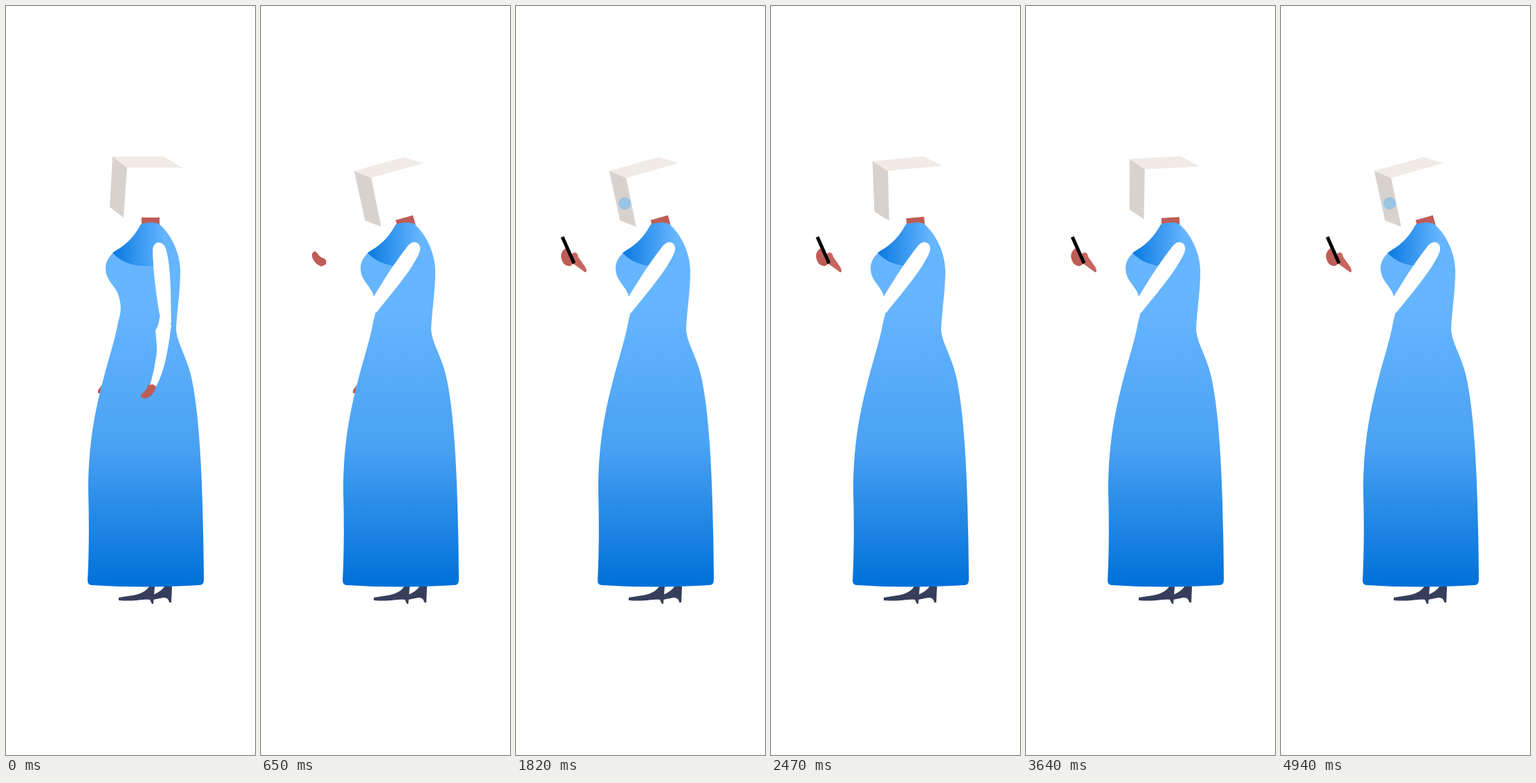
An HTML page for the animation above (5.2 s loop, 360 by 1080 pixels).

```html
<!DOCTYPE html>
<html lang="en">
<head>
<meta charset="utf-8">
<title>Woman in a blue dress</title>
<style>
  html, body { margin: 0; height: 100%; overflow: hidden; background: #fff; }
  svg { display: block; width: 100%; height: 100%; }
</style>
</head>
<body>
<svg viewBox="0 0 360 1080">
  <defs>
    <linearGradient id="cloth" gradientUnits="userSpaceOnUse" x1="0" y1="430" x2="0" y2="835">
      <stop stop-color="#66b5ff"/>
      <stop offset=".5" stop-color="#4aa2f3"/>
      <stop offset="1" stop-color="#0071d9"/>
    </linearGradient>
    <linearGradient id="shade" gradientUnits="userSpaceOnUse" x1="155" y1="0" x2="230" y2="0">
      <stop stop-color="#0a7ae0"/>
      <stop offset="1" stop-color="#66b5ff"/>
    </linearGradient>
  </defs>

  <g fill="#363e5c">
    <path d="M163 853C180 850 199 850 207 837H215L213 862H211L208 856C198 855 187 859 163 857Z"/>
    <path d="M213 849Q226 843 229 837H240L239 860H236Q235 853 228 853L213 856Z"/>
  </g>
  <path id="backHand" fill="#be5c56" d="M139 546L133 554V558L137 559Z"/>
  <path id="neck" fill="#be5c56" d="M196 305H222V320H196Z"/>

  <path fill="url(#cloth)" d="M195 315Q209 310 221 314C237 327 252 355 252 382C252 412 247 440 246 465
    C246 485 262 505 269 540C282 605 285 710 286 827Q286 835 280 835Q200 840 123 835Q118 834 118 828
    Q121 770 119 700C119 640 126 595 139 545C147 512 157 485 163 452C167 440 167 428 161 413
    C155 401 144 394 144 378C144 365 153 357 160 352C176 343 187 330 195 315Z"/>
  <path fill="url(#shade)" d="M195 315Q209 310 221 314L238 338L234 371Q180 384 154 356L160 352C176 343 187 330 195 315Z"/>

  <!-- Limbs are drawn hanging down, with the joint at 0,0 -->
  <g id="forearm">
    <path id="hand" fill="#be5c56" d="M-25 92C-28 104 -36 102 -35 108C-32 113 -23 111 -17 103C-12 96 -13 91 -15 90Q-20 88 -25 92Z"/>
    <path fill="#fff" d="M-8 -7Q-8 2 -14 13C-13 25 -10 42 -14 56Q-16 72 -22 92Q-18 88 -13 94C-2 72 3 52 9 5Z"/>
  </g>
  <path id="upperArm" fill="#fff" d="M-10 3C-10 -12 5 -13 9 0C17 25 16 70 17 105Q15 116 6 114L0 95C-5 65 -9 35 -10 3Z"/>

  <g id="phone">
    <path fill="#be5c56" d="M74 348Q65 352 65 361Q67 375 78 375L84 371Z"/>
    <path fill="#c8655f" d="M81 357Q88 352 90 362L100 376Q104 384 100 384L82 371Z"/>
    <path stroke="#000" stroke-width="5" d="M67 333L84 371"/>
  </g>

  <g id="head">
    <path fill="#d8d2ce" d="M154 217L175 233L170 305L150 290Z"/>
    <path fill="#f0ebe7" d="M154 217L175 233H254L228 217Z"/>
    <circle id="badge" cx="163" cy="268" r="9" fill="#9bc4e2"/>
  </g>
</svg>
<script>
const LOOP = 5200, STEP = 130;
const $ = id => document.getElementById(id);
const move = (id, transform) => $(id).setAttribute('transform', transform);
const show = (id, on) => $(id).style.display = on ? '' : 'none';

function draw(t) {
  const ramp = (from, to) => Math.min(1, Math.max(0, (t - from) / (to - from)));

  // Head bows to the phone, lifts, snaps up to look around, then bows again
  const lookingUp = t >= 2730 && t < 3640;
  const tilt = lookingUp ? 8.8
    : -15.5 * ramp(0, 650) + 12.6 * ramp(1950, 2600) - 12.6 * ramp(3640, 4160);
  move('head', `rotate(${tilt} 221 298)`);
  move('neck', `rotate(${tilt} 209 312)`);
  $('badge').setAttribute('opacity', ramp(650, 910) - ramp(1950, 2210) + ramp(3900, 4160));

  // The elbow bends first, then the whole arm lifts
  const lift = 40 * ramp(390, 650);
  const bend = 84 * ramp(0, 390) + 38 * ramp(390, 650);
  move('upperArm', `translate(222 350) rotate(${lift})`);
  move('forearm', `translate(222 350) rotate(${lift}) translate(8 105) rotate(${bend - lift})`);
  move('hand', `rotate(${-bend / 4} -18 92)`);

  const holding = t >= 780;
  show('phone', holding);
  show('hand', !holding);
  show('backHand', !holding);
}

function tick() {
  const t = performance.now() % LOOP;
  draw(Math.floor(t / STEP) * STEP);
  requestAnimationFrame(tick);
}
tick();
</script>
</body>
</html>
```
